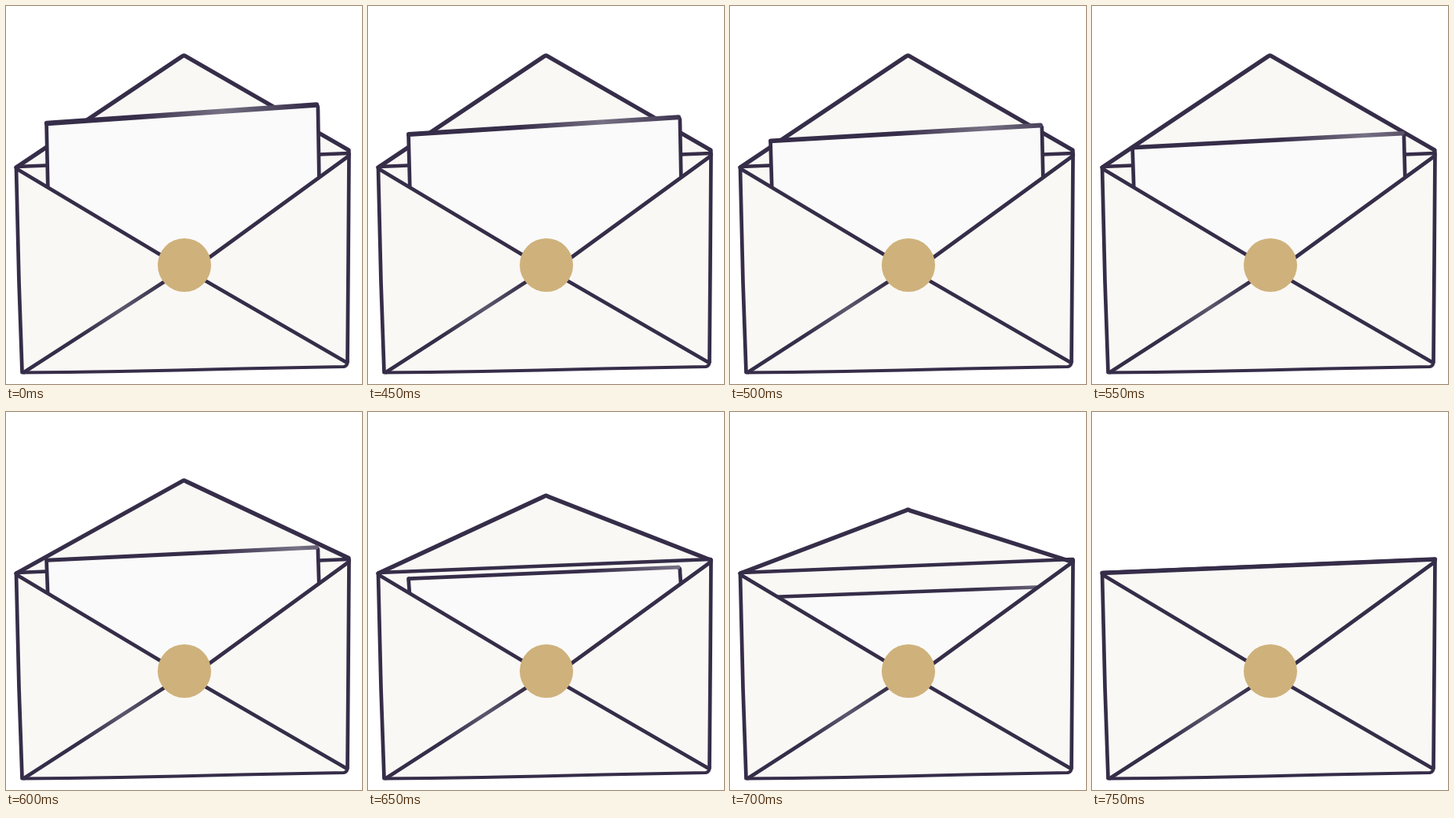
These frames come from a looping animation (453 px wide and 480 px high, 1300 ms). An HTML page:

```html
<!DOCTYPE html>
<html lang="en">
<head>
<meta charset="utf-8">
<title>Envelope closing</title>
<style>
  html, body { margin: 0; width: 100%; height: 100%; overflow: hidden; background: #fff; }
  svg { display: block; width: 100vw; height: 100vh; }
  .ink { fill: none; stroke: #362d49; stroke-width: 4.7; stroke-linecap: round; stroke-linejoin: round; }
  .cream { fill: #faf8f5; }
  #flap { stroke-width: 5.4; }
  #edge { stroke: url(#sheen); }
  #crease { stroke: url(#fold); }
  #base { stroke-width: 4; }
</style>
</head>
<body>
<svg viewBox="0 0 453 480">
  <defs>
    <linearGradient id="sheen" gradientUnits="userSpaceOnUse">
      <stop offset="0" stop-color="#362d49"/>
      <stop offset=".5" stop-color="#777184"/>
      <stop offset="1" stop-color="#362d49"/>
    </linearGradient>
    <linearGradient id="fold" gradientUnits="userSpaceOnUse" x1="22" y1="465" x2="203" y2="349">
      <stop offset=".4" stop-color="#362d49"/>
      <stop offset=".7" stop-color="#5d566c"/>
      <stop offset="1" stop-color="#362d49"/>
    </linearGradient>
  </defs>

  <path class="cream" d="M13 205 437 187V195L227 335Z"/>
  <path id="flap" class="cream ink"/>
  <path class="ink" d="M14 204Q220 195 436 187"/>

  <g id="paper">
    <path id="sheet" fill="#fafafa"/>
    <path id="sides" class="ink"/>
    <path id="edge" class="ink"/>
  </g>

  <path class="cream" d="M13 206 227 335 437 190 434 457 21 466Z"/>
  <path class="ink" d="M13 205Q14.500 270 16.500 350L20.500 465M434.500 452 435.500 330 436.500 188"/>
  <path id="base" class="ink" d="M20.500 465.500Q130 465 300 460.500L430 458Q434.500 457 434.500 452"/>
  <path class="ink" d="M14 207 200 318M436 190.500 255 322M434 453 247 345"/>
  <path id="crease" class="ink" d="M23 465 207 346.500"/>
  <circle cx="227" cy="329" r="34" fill="#cfb17b"/>
</svg>
<script>
  const LOOP = 1300, START = 450, STEP = 50, STEPS = 7;

  const $ = id => document.getElementById(id);
  const set = (id, attrs) => {
    for (const key in attrs) $(id).setAttribute(key, attrs[key]);
  };

  // The flap starts folding after step 3, slowing down, and shuts on the last step.
  function drawFlap(step) {
    const n = Math.max(0, step - 3);
    const tip = 63 + 24 * n ** 0.85;
    const d = step === STEPS
      ? 'M13 204.500 436.500 187'
      : `M13 205 224 ${tip + 1}Q226.500 ${tip - 1} 229 ${tip + 1}L436 ${183 + 2.5 * n}V188`;
    set('flap', { d });
  }

  // The sheet sinks steadily, faster once the flap pushes it, and levels out a little.
  function drawPaper(step) {
    const drop = step && 5.6 + 8.4 * step + 15 * Math.max(0, step - 4);
    const left = 149 + drop;
    const right = 125.5 + drop + 1.8 * step;
    const glint = 275 + 24 * step;
    set('paper', { visibility: step < STEPS ? 'visible' : 'hidden' });
    set('sheet', { d: `M52 ${left}L397 ${right}V340H53Z` });
    set('sides', { d: `M51.500 ${left}L53.500 240M394 ${right}Q397.500 ${right} 397 ${right + 6}L398.500 225` });
    set('edge', { d: `M52 ${left}L395 ${right}`, 'stroke-width': 5, style: `stroke-width:${6.5 - 0.35 * step}` });
    set('sheen', { x1: glint - 110, x2: glint + 110 });
  }

  let shown = -1;
  function tick() {
    const t = performance.now() % LOOP;
    const step = Math.max(0, Math.min(STEPS, 1 + Math.floor((t - START) / STEP)));
    if (step !== shown) {
      shown = step;
      drawFlap(step);
      drawPaper(step);
    }
    requestAnimationFrame(tick);
  }
  tick();
</script>
</body>
</html>
```
